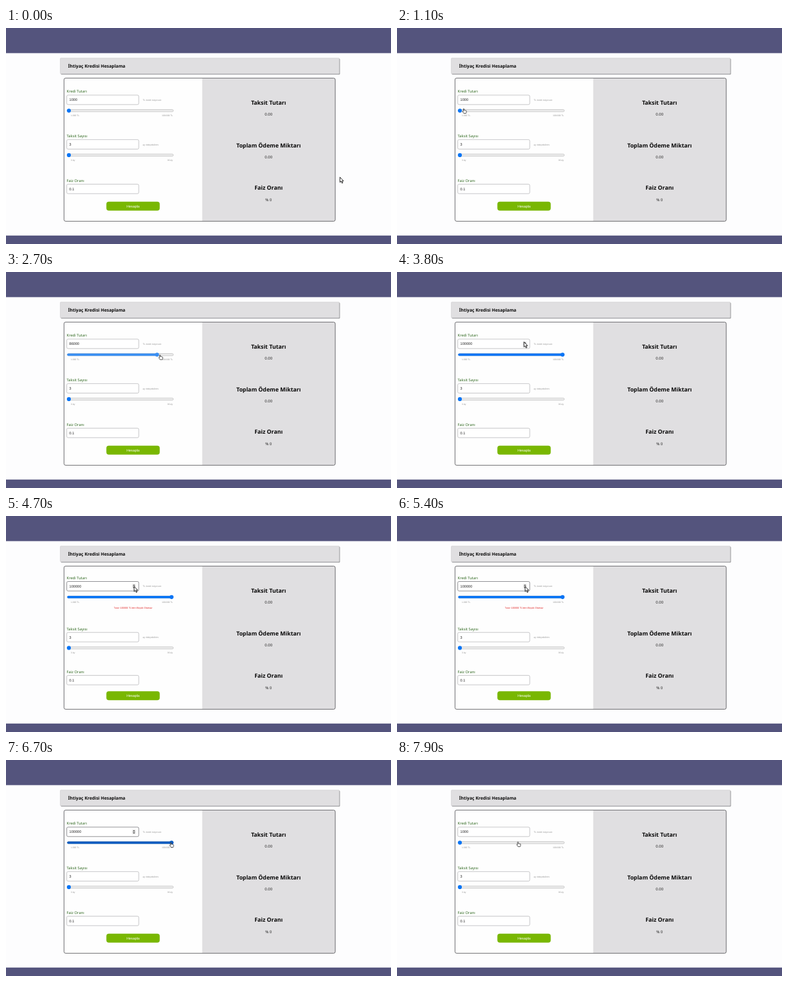
Animation of 600x338 px, one loop 8000 ms. Source, as an HTML page:

```html
<!DOCTYPE html>
<html lang="tr">
<head>
<meta charset="utf-8">
<title>Kredi Hesaplama</title>
<style>
  html, body { margin: 0; width: 100%; height: 100%; overflow: hidden; background: #fdfdfe; }
  svg { display: block; width: 100%; height: 100%; }
  text { text-rendering: geometricPrecision; white-space: pre; }
  .title, .result, .label, .amount { font-family: "Noto Sans", "Open Sans", sans-serif; }
  .title, .result { font-weight: 700; fill: #080808; }
  .title { font-size: 6.86px; }
  .result { font-size: 8.8px; text-anchor: middle; }
  .amount { font-size: 5.9px; fill: #222; text-anchor: middle; }
  .label { font-size: 5.8px; fill: #2f681f; }
  .value, .hint, .range, .button, .error { font-family: "Liberation Sans", Arial, sans-serif; }
  .value { font-size: 5.6px; fill: #222; }
  .hint { font-size: 3.7px; fill: #999; }
  .range { font-size: 3.4px; fill: #8c8c8c; }
  .end { text-anchor: end; }
  .button { font-size: 5.5px; fill: #fff; text-anchor: middle; }
  .error { font-size: 3.75px; fill: #e02424; text-anchor: middle; }
  .box { fill: #fff; stroke: #b9b9bb; stroke-width: .8; }
  .track { fill: #ececec; stroke: #b4b4b4; stroke-width: .6; }
  .cursor path { fill: #fff; stroke: #111; stroke-width: .9; stroke-linejoin: round; }
</style>
</head>
<body>
<svg id="stage" viewBox="0 0 600 338" preserveAspectRatio="none"></svg>
<script>
const LOOP = 8000, STEP = 100;
const MIN_X = 98, MAX_X = 258, MIN_VALUE = 1000, MAX_VALUE = 100000;
const BLUE = '#0a75f5', BLUE_ACTIVE = '#3a8ff2', BLUE_HOVER = '#0b5cc0';

const text = (cls, x, y, content, id = '') =>
  `<text class="${cls}" x="${x}" y="${y}" ${id && `id="${id}"`}>${content}</text>`;

const field = (id, y, label, value) =>
  text('label', 94.6, y - 11.1, label) +
  `<rect class="box" id="${id}Box" x="94.7" y="${y - 7.4}" width="112.2" height="14.8" rx="2"/>` +
  text('value', 98.6, y + 2, value, id + 'Value');

const slider = (id, y, from, to) =>
  `<rect class="track" x="95.6" y="${y - 1.7}" width="165.2" height="3.4" rx="1.7"/>
   <rect id="${id}Fill" x="95.3" y="${y - 1.9}" width="0" height="3.8" rx="1.9" fill="${BLUE}"/>
   <circle id="${id}Thumb" cx="${MIN_X}" cy="${y}" r="3.1" fill="${BLUE}"/>` +
  text('range', 101, y + 8.8, from) + text('range end', 260, y + 8.8, to);

const result = (y, label, amount) =>
  text('result', 409.2, y, label) + text('amount', 409.2, y + 17.3, amount);

document.getElementById('stage').innerHTML = `
  <rect width="600" height="338" fill="#fdfdfe"/>
  <rect width="600" height="40.2" fill="#c9c9d8"/>
  <rect width="600" height="39" fill="#54547d"/>
  <rect y="324" width="600" height="14" fill="#d5d5e0"/>
  <rect y="325" width="600" height="13" fill="#54547d"/>

  <rect x="85.6" y="48" width="434.8" height="24.8" rx="1" fill="#8d8d8f"/>
  <rect x="84.6" y="47" width="434.8" height="24.8" rx="1" fill="#e0dfe1" stroke="#c4c4c6" stroke-width=".5"/>
  ${text('title', 96.8, 62, 'İhtiyaç Kredisi Hesaplama')}

  <rect x="90.4" y="78.4" width="422.7" height="224" rx="2.5" fill="#fefefe"/>
  <path d="M305.8 78.4H510.6a2.5 2.5 0 0 1 2.5 2.5V299.9a2.5 2.5 0 0 1-2.5 2.5H305.8z" fill="#e0dfe1"/>
  <rect x="90.4" y="78.4" width="422.7" height="224" rx="2.5" fill="none" stroke="#4c4c50" stroke-width=".8"/>

  <g id="loan">
    ${field('loan', 112.4, 'Kredi Tutarı', '1000')}
    <g id="spinner">
      <rect x="196.4" y="108.6" width="6" height="7.8" fill="#ededed"/>
      <path d="M197.4 111.8l2-2.4 2 2.4zM197.4 113.2l2 2.4 2-2.4z" fill="#555"/>
    </g>
    ${text('hint', 213, 113.8, 'TL kredi istiyorum')}
    ${slider('loan', 129.3, '1.000 TL', '100.000 TL')}
  </g>
  ${text('error', 198, 144.5, "Tutar 100000 TL'den Büyük Olamaz", 'error')}
  <g id="term">
    ${field('term', 182.1, 'Taksit Sayısı', '3')}
    ${text('hint', 213, 183.5, 'ay ödeyebilirim')}
    ${slider('term', 198.9, '3 Ay', '36 Ay')}
  </g>
  <g id="rate">${field('rate', 251.8, 'Faiz Oranı', '0.1')}</g>
  <g id="submit">
    <rect x="156.4" y="271.8" width="83.2" height="14" rx="4" fill="#79b702"/>
    ${text('button', 198, 280.8, 'Hesapla')}
  </g>

  ${result(119.6, 'Taksit Tutarı', '0.00')}
  ${result(186.6, 'Toplam Ödeme Miktarı', '0.00')}
  ${result(253.4, 'Faiz Oranı', '% 0')}

  <g class="cursor" id="arrow"><path d="M.4.4V8.4L2.2 6.8 3.6 9.8 5 9.2 3.6 6.3H6z"/></g>
  <g class="cursor" id="hand"><path style="stroke-width:.7" d="M-.7.7Q0-.4.7.7V3Q1.5 2.5 2 3.1 2.8 2.7 3.2 3.4 4.2 3.1 4.2 4.2V5.6Q4.1 6.7 3.5 7.6H.1Q-.9 6-1.8 4.8-1.9 3.7-.7 4.4z"/></g>`;

const el = Object.fromEntries([...document.querySelectorAll('[id]')].map(e => [e.id, e]));

// Each row: time, then the values reached at that time.
const cursorPath = [
  [0, 520, 233], [100, 517, 232], [500, 300, 176], [800, 130, 129], [1000, 108, 126],
  [1100, 104, 126], [1500, 102, 126.5], [1600, 102, 126.5], [2700, 240, 129.5],
  [3100, 263, 130], [3400, 270, 130], [3800, 197.5, 109], [4100, 197, 107.5],
  [4300, 199.3, 109.8], [5800, 199.3, 109.8], [6600, 257, 129], [6800, 257, 129],
  [7500, 97, 129], [7700, 89, 128.5], [7900, 188.5, 128]
];
const thumbPath = [
  [0, MIN_X], [1600, MIN_X], [2700, 235.4], [3100, MAX_X], [6800, MAX_X], [7500, MIN_X]
];

function sample(path, time) {
  const next = path.findIndex(row => row[0] > time);
  if (next < 0) return path[path.length - 1].slice(1);
  const a = path[next - 1], b = path[next];
  const k = (time - a[0]) / (b[0] - a[0]);
  return a.slice(1).map((v, i) => v + (b[i + 1] - v) * k);
}

const within = (time, start, end) => time >= start && time < end;
const show = (node, visible) => node.setAttribute('visibility', visible ? 'visible' : 'hidden');
const move = (node, x, y) => node.setAttribute('transform', `translate(${x} ${y})`);

function render(time) {
  const [thumbX] = sample(thumbPath, time);
  const progress = (thumbX - MIN_X) / (MAX_X - MIN_X);
  const value = MIN_VALUE + progress * (MAX_VALUE - MIN_VALUE);
  el.loanValue.textContent = Math.round(value / 1000) * 1000;

  const dragging = within(time, 1700, 3200) || within(time, 6800, 7700);
  const color = dragging ? BLUE_ACTIVE : within(time, 6500, 6800) ? BLUE_HOVER : BLUE;
  el.loanThumb.setAttribute('cx', thumbX);
  el.loanThumb.setAttribute('fill', color);
  el.loanFill.setAttribute('width', progress > 0 ? thumbX - 95.3 : 0);
  el.loanFill.setAttribute('fill', color);

  el.loanBox.style.stroke = within(time, 4700, 6800) ? '#77777c' : '';
  show(el.spinner, within(time, 3700, 6800));

  const invalid = within(time, 4700, 5700);
  show(el.error, invalid);
  move(el.loan, 0, invalid ? -2.5 : 0);
  move(el.term, 0, invalid ? 7.5 : 0);
  move(el.rate, 0, invalid ? 5 : 0);
  move(el.submit, 0, invalid ? 2.4 : 0);

  const [x, y] = sample(cursorPath, time);
  const pointing = within(time, 900, 3300) || time >= 6500;
  show(el.hand, pointing);
  show(el.arrow, !pointing);
  move(pointing ? el.hand : el.arrow, x, y);
}

const start = performance.now();
function tick() {
  const elapsed = (performance.now() - start) % LOOP;
  render(Math.floor(elapsed / STEP) * STEP);
  requestAnimationFrame(tick);
}
tick();
</script>
</body>
</html>
```
